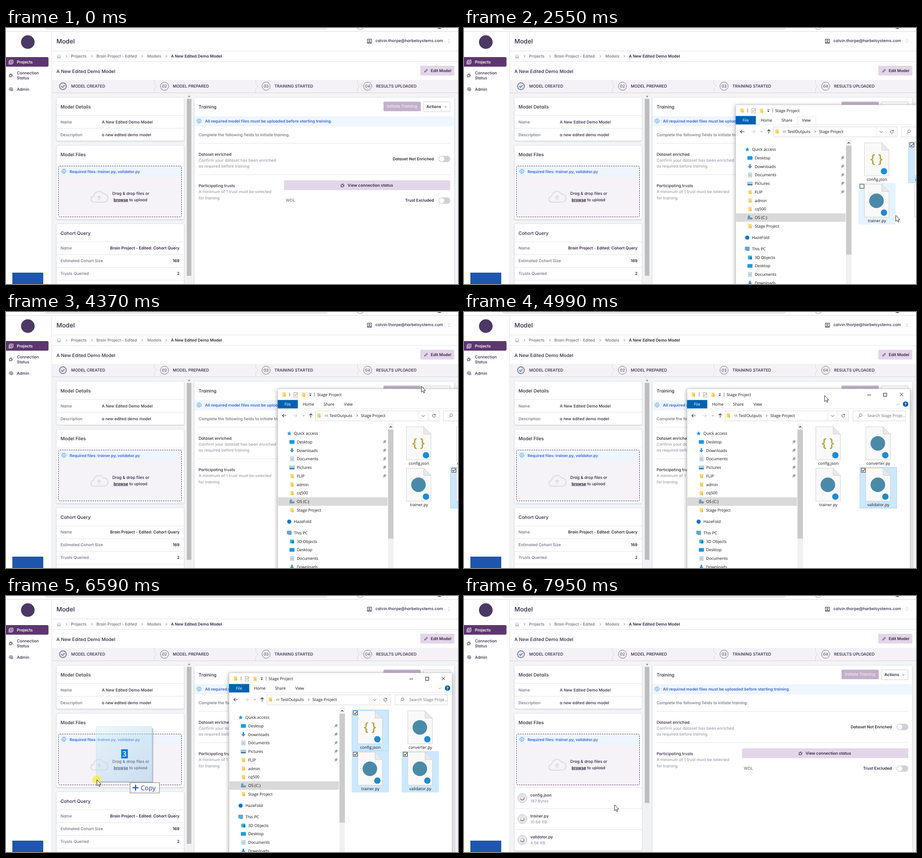
An HTML page that plays this animation: 995 by 563 pixels, repeating every 8000 ms.

```html
<!DOCTYPE html>
<html lang="en">
<head>
<meta charset="utf-8">
<title>Model upload</title>
<style>
html, body { margin: 0; width: 100%; height: 100%; overflow: hidden; background: #fff; }
svg { display: block; width: 995px; height: 563px; }
text { font-family: Inter, sans-serif; font-feature-settings: "cv11"; text-rendering: geometricPrecision; white-space: pre; }
#explorer text, #ghost text { font-family: "Open Sans", "Noto Sans", sans-serif; font-feature-settings: normal; }
#explorer { filter: drop-shadow(0 2px 5px rgba(0, 0, 0, .38)); }
.card { fill: #fff; stroke: #e3e5ea; filter: drop-shadow(0 1px 1px rgba(0, 0, 0, .14)); }
.spin { animation: spin 1s linear infinite; transform-box: fill-box; transform-origin: center; }
@keyframes spin { to { transform: rotate(360deg); } }
</style>
</head>
<body>
<svg id="stage" viewBox="0 0 995 563"></svg>
<script>
const INK = '#2e2640', GREY = '#6d717c', PALE = '#9b9faa', LINE = '#e3e5ea', BLUE = '#3e5fd6', LILAC = '#e4d6e9';

const text = (x, y, str, { size = 8.8, weight = 500, fill = INK, anchor = 'start' } = {}) =>
  `<text x="${x}" y="${y}" font-size="${size}" font-weight="${weight}" fill="${fill}" text-anchor="${anchor}">${str}</text>`;
const rect = (x, y, w, h, fill, extra = '') => `<rect x="${x}" y="${y}" width="${w}" height="${h}" fill="${fill}" ${extra}/>`;
const disc = (x, y, r, fill, extra = '') => `<circle cx="${x}" cy="${y}" r="${r}" fill="${fill}" ${extra}/>`;
const path = (d, stroke = INK, width = 1, fill = 'none', extra = '') =>
  `<path d="${d}" stroke="${stroke}" stroke-width="${width}" fill="${fill}" ${extra}/>`;
const rule = (x1, x2, y, color = LINE) => path(`M${x1} ${y}H${x2}`, color);
const chevron = (x, y, color = GREY, s = 2.5) => path(`M${x - s / 2} ${y - s}l${s} ${s}l${-s} ${s}`, color);
const caret = (x, y, color = GREY, s = 2.5) => path(`M${x - s} ${y - s / 2}l${s} ${s}l${s} ${-s}`, color);
const card = (x, y, w, h) => `<rect class="card" x="${x}" y="${y}" width="${w}" height="${h}" rx="3"/>`;
const info = (x, y) => disc(x, y, 4.5, '#d9eaff', 'stroke="#3f8ae0"') + path(`M${x} ${y - 2.6}v1.2M${x} ${y - .4}v3`, '#3f8ae0', 1.2);
const plug = (x, y) => `<g transform="translate(${x} ${y}) rotate(45)">` +
  path('M-3 -1H3V1.5Q3 3.5 0 3.5Q-3 3.5 -3 1.5ZM-1.5 -1V-4M1.5 -1V-4M0 3.5V6') + '</g>';
const toggle = y => rect(952, y - 7, 26, 14, '#cfd1d6', 'rx="7"') + disc(959.2, y, 5.8, '#fff');

function chrome() {
  const crumbs = [[143, 'Projects'], [199, 'Brain Project - Edited'], [311, 'Models']];
  const steps = ['MODEL CREATED', 'MODEL PREPARED', 'TRAINING STARTED', 'RESULTS UPLOADED'];
  const done = disc(125.3, 128, 7.6, '#dbe3ec', 'stroke="#41506b" stroke-width="1.2"') + path('M121.8 128.2l2.4 2.4l4.6-4.8', '#41506b', 1.1);
  return rect(0, 0, 995, 563, '#fff') + rect(101, 143, 894, 420, '#f3f4f6') +
    rect(83, -12, 627, 16, '#e9ebee', 'rx="8"') + disc(780, -4, 7.5, 'none', 'stroke="#b9bbc0" stroke-width="1.5"') +
    disc(954, -4, 6, '#7c3550') + rule(0, 995, 7.5, '#d9dce1') + path('M100.5 8V563', LINE) +
    disc(48, 31, 15, '#4c3865') +
    rect(-4, 64, 97.6, 21, '#5e366f', 'rx="3"') + text(24, 77.5, 'Projects', { weight: 600, fill: '#fff' }) +
    path('M8.5 70.5h7v7h-7zM6.5 72v7.5h7.5M10 73h4M10 75h4', '#fff') +
    text(24, 102.3, 'Connection') + text(24, 113.3, 'Status') + plug(11, 104) + text(24, 137.5, 'Admin') +
    path('M7 136a4 4 0 0 1 8-2v4M9 138v-3a2 2 0 0 1 4 0v4M11 134.5v4.5', INK, .9) +
    rect(14, 538, 68, 68, '#1f56ad') +
    text(111, 33.5, 'Model', { size: 13.6 }) +
    text(962, 31.3, 'calvin.thorpe@harbelsystems.com', { anchor: 'end', size: 8.9 }) +
    path('M795.5 24.5h9v9h-9zM797.3 33v-1.5h5.4V33', INK) + disc(800, 28, 1.7, 'none', `stroke="${INK}"`) +
    path('M973 27.5l2-2l2 2M973 30l2 2l2-2', PALE, .8) + rule(101, 995, 50.5) +
    path('M112.5 62l4.2-4l4.2 4M113.7 61v5h6v-5M115.5 66v-3h2.4v3', PALE, .9) +
    [133, 189, 300, 353].map(x => chevron(x, 62)).join('') +
    crumbs.map(([x, s]) => text(x, 65.2, s, { fill: GREY })).join('') +
    text(363, 65.2, 'A New Edited Demo Model', { weight: 600 }) + rule(101, 995, 73.5) +
    text(111, 98.5, 'A New Edited Demo Model', { size: 10.2 }) +
    rect(912, 83, 75, 21.5, LILAC, 'rx="2"') + text(980, 97.2, 'Edit Model', { weight: 600, anchor: 'end' }) +
    path('M921.5 97l.5-2l4.5-4.5l1.6 1.6l-4.5 4.5z', INK) +
    rect(101, 114, 894, 28, '#f4f1f7') + rule(101, 995, 142.5, '#d8d3de') + done +
    steps.map((s, i) => {
      const x = 125.3 + 223.6 * i;
      const number = disc(x, 128, 9, 'none', 'stroke="#77717f"') + text(x, 131.2, '0' + (i + 1), { anchor: 'middle', fill: '#5f5967' });
      return (i ? number : '') + text(x + 18.3, 131.2, s, { size: 8.9 }) +
        (i < 3 ? path(`M${x + 201} 114v8l5 6l-5 6v8`, '#dbd6e1') : '');
    }).join('');
}

const row = (y, label, value) => text(120, y, label, { fill: GREY }) + text(382, y, value, { anchor: 'end', weight: 600 });

function fileCard() {
  return rect(116, 303.5, 271, 112, '#f5f2f8') + rect(116, 304, 271, 23, '#edf5ff') +
    rect(115.5, 303.5, 271, 112, 'none', 'rx="3" stroke="#4b2e63" stroke-dasharray="3 2"') +
    text(120, 282, 'Model Files', { size: 10.2 }) + rule(111, 392, 297.5, '#f0f0f3') + info(127.5, 315) +
    text(140, 318.5, 'Required files: trainer.py, validator.py', { size: 8.55, weight: 600, fill: BLUE }) +
    path('M196 383h-2a6.5 6.5 0 0 1-1-13a12 12 0 0 1 22-5a9 9 0 0 1 1 18h-2zM205 379v-9M201 373.5l4-4l4 4', '#dfdde4', 2.6) +
    text(234, 367.3, 'Drag &amp; drop files or') +
    text(237, 380.5, '<tspan font-weight="700" text-decoration="underline">browse</tspan> to upload');
}

function columns() {
  const files = [['config.json', '187 Bytes'], ['trainer.py', '10.68 KB'], ['validator.py', '4.56 KB']];
  const note = { fill: PALE };
  return card(111, 152.5, 281, 95.5) + text(120, 176.5, 'Model Details', { size: 10.2 }) + rule(111, 392, 192.5) +
    text(120, 209.5, 'Name', { fill: GREY }) + text(211, 209.5, 'A New Edited Demo Model') + rule(111, 392, 220.5) +
    text(120, 237.5, 'Description', { fill: GREY }) + text(211, 237.5, 'a new edited demo model') +
    `<g id="empty">${card(111, 258, 281, 163)}${card(111, 430.5, 281, 180)}` +
    text(120, 454.5, 'Cohort Query', { size: 10.2 }) + [470.5, 498.5, 526.5, 554.5].map(y => rule(111, 392, y)).join('') +
    row(487.3, 'Name', 'Brain Project - Edited: Cohort Query') + row(515.3, 'Estimated Cohort Size', '169') +
    row(543.3, 'Trusts Queried', '2') + '</g>' +
    `<g id="filled">${card(111, 258, 281, 302)}` + files.map(([name, size], i) => {
      const y = 444.5 + 46 * i;
      return rule(111, 392, y - 23) + disc(128.3, y, 10, '#ececef', 'stroke="#b9b9bf"') + disc(128.3, y, 7.5, '#f6f6f8', 'stroke="#d2d2d7"') +
        `<g class="spin">${disc(128.3, y, 4, '#fff', 'stroke="#bbbbc2" stroke-width="1.5"')}${path(`M124.3 ${y}a4 4 0 0 0 8 0`, '#4a4a55', 1.5)}</g>` +
        text(146, y - 4, name) + text(146, y + 9, size, note);
    }).join('') + '</g>' + fileCard() +
    rect(397.5, 143, 11.5, 420, '#f1f1f1') + rect(398, 156, 10, 389, '#bdbdbd', 'id="thumb"') +
    path('M400.5 151.5l2.5-3l2.5 3z', 'none', 0, '#777') +
    card(414.5, 152.5, 572.5, 430) + text(424, 177.3, 'Training', { size: 10 }) +
    rect(831, 162, 82, 21, '#c2b1c9', 'rx="2"') + text(872, 175.3, 'Initiate Training', { weight: 600, fill: '#eee7f1', anchor: 'middle' }) +
    rect(918.5, 162.5, 59, 21.5, '#fff', 'rx="2" stroke="#cfcad4"') + text(925.5, 176, 'Actions', { weight: 600 }) + caret(967.5, 173.5, INK, 2) +
    rect(415, 194, 572, 22, '#eef6ff') + info(425, 204.5) +
    text(438, 208, 'All required model files must be uploaded before starting training.', { weight: 600, fill: BLUE }) +
    text(424, 237.5, 'Complete the following fields to initiate training.', { fill: GREY }) + rule(424, 978, 253.5) +
    text(424, 280.5, 'Dataset enriched') + text(424, 293.7, 'Confirm your dataset has been enriched', note) +
    text(424, 307, 'as required before training', note) + text(942, 291.3, 'Dataset Not Enriched', { anchor: 'end', weight: 600 }) +
    toggle(288) + rule(424, 978, 322.5) +
    text(424, 350, 'Participating trusts') + text(424, 363.3, 'A minimum of 1 trust must be selected', note) + text(424, 376.5, 'for training', note) +
    rect(612, 335, 366, 21.5, LILAC, 'rx="2"') + plug(741, 346) + text(752, 348.5, 'View connection status', { weight: 600 }) +
    text(616, 382.3, 'WDL', { fill: GREY }) + text(942, 382.3, 'Trust Excluded', { anchor: 'end', weight: 600 }) + toggle(379.5);
}

const folder = (x, y) => rect(x - 3.5, y - 4.5, 7, 9, '#ffd668') + rect(x + .5, y, 3, 4.5, '#f3b93c');
const icons = {
  star: (x, y) => path(`M${x} ${y - 5}l1.4 3.4l3.6.3l-2.8 2.3l1 3.6l-3.2-2l-3.2 2l1-3.6l-2.8-2.3l3.6-.3z`, 'none', 0, '#2b93dd'),
  screen: (x, y) => rect(x - 5.5, y - 4, 11, 8, '#149be8'),
  down: (x, y) => path(`M${x - 1.7} ${y - 5}h3.4v4.5h3l-4.7 5.2l-4.7-5.2h3z`, 'none', 0, '#3b93d4'),
  doc: (x, y) => rect(x - 3.5, y - 4.5, 7.5, 9, '#e9f3fa', 'stroke="#8fa9ba" stroke-width=".8"') + path(`M${x - 2} ${y - 1}h4.5M${x - 2} ${y + 1.5}h4.5`, '#3d8fc9'),
  photo: (x, y) => rect(x - 5.5, y - 3.5, 11, 7.5, '#a9d8f2', 'stroke="#90a4b2" stroke-width=".7"') + rect(x - 5, y + 1, 10, 2.5, '#3d7195'),
  folder,
  drive: (x, y) => rect(x - 5.5, y - .5, 11, 4.5, '#8b9299') + rect(x - 4.5, y - 4.5, 4.5, 4, '#22a0e8'),
  cloud: (x, y) => disc(x, y, 4.5, '#0f74c7'),
  pc: (x, y) => rect(x - 4.5, y - 4, 9, 6.5, '#4eb1e8', 'stroke="#63798a" stroke-width=".8"') + rect(x - 2, y + 3, 7, 1.5, '#7c8a94'),
  cube: (x, y) => rect(x - 4.5, y - 4, 9, 8.5, '#35b6dd', 'rx="1.5"') + rect(x, y - 1, 4.5, 5.5, '#1479b8')
};

const tiles = [['config.json', 0, 0], ['converter.py', 1, 0], ['trainer.py', 0, 1], ['validator.py', 1, 1]]
  .map(([name, col, line]) => ({ name, x: 270 + 110 * col, y: 81 + 91 * line }));

function tile({ name, x, y }, i) {
  return `<g id="tile${i}" transform="translate(${x} ${y})">` + rect(.5, .5, 81, 90, '#cce8ff', 'class="back"') +
    path('M13.5 2.5h38l16 16v56.5h-54z', '#d2d2d2', 1, '#f9f9f9') + path('M51.5 2.5v16h16z', '#cfcfcf', 1, '#e9e9e9') +
    (i ? disc(40, 39, 16, '#4a8aa9') : text(40, 47, '{ }', { size: 27, weight: 600, fill: '#bfa032', anchor: 'middle' })) +
    disc(56.5, 65, 7, '#1f8ad2') + text(41, 85.8, name, { size: 8.9, weight: 400, fill: '#111', anchor: 'middle' }) +
    `<g class="box">${rect(3.5, 2.5, 9, 9, '#fff', 'stroke="#333"')}${path('M5.3 7l2.2 2.3l4-5', '#222', 1.2, 'none', 'class="tick"')}</g></g>`;
}

function explorer() {
  const label = (x, y, s, fill = '#111') => text(x, y, s, { size: 8.9, weight: 400, fill });
  const quick = [['star', 'Quick access'], ['screen', 'Desktop'], ['down', 'Downloads'], ['doc', 'Documents'], ['photo', 'Pictures'],
    ['folder', 'FLIP'], ['folder', 'admin'], ['folder', 'cq500'], ['drive', 'OS (C:)'], ['folder', 'Stage Project']];
  const pc = [['pc', 'This PC'], ['cube', '3D Objects'], ['screen', 'Desktop'], ['doc', 'Documents'], ['down', 'Downloads']];
  const list = (items, top) => items.map(([icon, name], i) => {
    const y = top + 18.75 * i, dx = i ? 6 : 0;
    return icons[icon](25.5 + dx, y) + label(36 + dx, y + 3.1, name);
  }).join('');
  const pin = y => `<g transform="translate(235 ${y}) rotate(40)">${path('M-1.5 -3.5h3v4h-3zM-3 .5h6M0 .5v4', '#868686', 1, '#b5b5b5')}</g>`;
  return rect(0, 0, 491, 431, '#fff', 'stroke="#b9b9b9" stroke-width=".6"') + folder(14, 12.5) + folder(57, 13) +
    path('M26.5 8v9M81.5 8v9', '#777') + rect(35.5, 8, 8, 10, '#fafafa', 'stroke="#999" stroke-width=".8"') + path('M37 13l2 2l4-5', '#c26c3b') +
    path('M69.5 10.5h5', '#333') + path('M69.5 13h5l-2.5 3z', 'none', 0, '#333') + label(87, 16.2, 'Stage Project') +
    path('M397 13.5h8M432.5 9.5h7v7h-7zM468.5 9l7 7M475.5 9l-7 7', '#111') +
    rect(0, 24.5, 44.5, 18.5, '#0063b1') + label(15, 37.2, 'File', '#fff') +
    rect(136.5, 25.5, 40, 18, '#fdfdfd', 'id="view" stroke="#e6e6e6"') +
    label(55, 37.2, 'Home') + label(101, 37.2, 'Share') + label(146, 37.2, 'View') + rule(1, 490, 43.5, '#ececec') +
    caret(464, 34, '#888', 3) + disc(481, 33.5, 6, '#0b63b0') + text(481, 37, '?', { size: 9, weight: 700, fill: '#fff', anchor: 'middle' }) +
    path('M19.5 59h-9M14 55.5l-3.5 3.5l3.5 3.5M73 63.5v-9M69.5 58l3.5-3.5l3.5 3.5', '#444', 1.2) +
    path('M33.5 59h9M39 55.5l3.5 3.5l-3.5 3.5', '#cfcfcf', 1.2) + caret(57, 59, '#666', 2) +
    rect(83.5, 48.5, 272, 22, '#fff', 'stroke="#d9d9d9"') + path('M309.5 49v21M331.5 49v21', '#e3e3e3') + folder(91, 58.5) +
    path('M107 56.5l-2.5 2.5l2.5 2.5M110.5 56.5l-2.5 2.5l2.5 2.5', '#555') + label(114, 62.1, 'TestOutputs') + chevron(175, 59, '#444') +
    label(183.5, 62.1, 'Stage Project') + caret(320.5, 59.5, '#444', 3.5) +
    path('M346.5 57a3.3 3.3 0 1 0 .8 2.5M347.3 55v2.5h-2.5', '#444') +
    rect(365.5, 48.5, 115, 22, '#fff', 'stroke="#d9d9d9"') + disc(382, 58, 3, 'none', 'stroke="#777"') + path('M380 60.2l-3.5 3.3', '#777') +
    label(397, 62.1, 'Search Stage Proje...', '#6d6d6d') +
    rect(1, 238.5, 241, 18.7, '#d9d9d9') + list(quick, 98) + icons.cloud(25.5, 292) + label(36, 295, 'HazeFold') + list(pc, 316.7) +
    [1, 2, 3, 4, 5].map(i => pin(98 + 18.75 * i)).join('') +
    rect(243, 76, 12, 331, '#f1f1f1') + rect(243, 90, 12, 239.5, '#cbcbcb') + path('M246.5 85l2.5-2.5l2.5 2.5', '#444', 1.3) +
    tiles.map(tile).join('') + rect(1, 408, 489, 22, '#fff') + label(12, 424, '4 items');
}

const ghost = `<defs><linearGradient id="glass" x2="1" y2="1"><stop stop-color="#d3f0f8" stop-opacity=".42"/>` +
  `<stop offset="1" stop-color="#8fc4e6" stop-opacity=".42"/></linearGradient></defs>` +
  path('M4 122H124V4', '#5a6f80', 3, 'none', 'opacity=".4"') + rect(0, 0, 122.5, 120.5, 'url(#glass)', 'stroke="#c4dbe9" stroke-opacity=".6"') +
  rect(55, 50, 14.5, 20, '#0078d7') + text(62.2, 66, '3', { size: 16, weight: 600, fill: '#fff', anchor: 'middle' }) +
  rect(74.5, 123.5, 64.5, 22.5, '#fff', 'stroke="#777"') + path('M80 134.5h13M86.5 128v13', '#1746b5', 2.2) +
  text(98, 140, 'Copy', { size: 14, weight: 400, fill: '#1b3d9e' });

const $ = id => document.getElementById(id);
$('stage').innerHTML = chrome() + columns() + `<g id="explorer">${explorer()}</g><g id="ghost">${ghost}</g>` +
  `<g id="cursor">${disc(0, 0, 9.5, '#f7ef3a', 'id="press" opacity=".75"')}${path('M.5 0V13.4L3.5 10.5L5.7 15L7.7 14.1L5.7 9.8H9.8Z', '#111', .9, '#fff')}</g>`;

const windowTrack = [[2070, 973, 139], [2140, 880, 148], [2210, 740, 163], [2350, 598, 169], [4570, 598, 169], [4900, 491, 169]];
const cursorTrack = [[590, 963, 550], [660, 963, 550], [2210, 896, 176], [2350, 754, 182], [2420, 754, 182], [2480, 757, 203], [2550, 950, 412],
  [2760, 950, 412], [2900, 1000, 395], [3389, 1000, 395], [3390, 949, 392], [3810, 905, 372], [3950, 905, 372], [4100, 908, 330],
  [4370, 914, 163], [4510, 914, 163], [4570, 904, 183], [4900, 797, 183], [4990, 793, 183], [5280, 880, 392], [5500, 812, 392],
  [5640, 812, 392], [5800, 803, 318], [6170, 803, 318], [6380, 600, 350], [6520, 300, 392], [6590, 200.5, 404], [6660, 135, 412],
  [6730, 122, 418], [6990, 132, 420], [7200, 200, 436], [7730, 331, 459]];
const ghostTrack = [[6240, 725, 205], [6380, 560, 235], [6520, 290, 275], [6590, 200, 287], [6660, 112, 293], [6730, 62, 299], [6920, 70, 301]];
const presses = [[2210, 2380], [4510, 4920], [5500, 5570], [5860, 5930], [6100, 6990], [7400, 7470]];
const selectedAt = [[5860, 8000], [0, 3190], [5500, 8000], [3190, 8000]];

function at(track, t) {
  const i = track.findIndex(k => k[0] > t);
  if (i < 0) return track[track.length - 1].slice(1);
  if (!i) return track[0].slice(1);
  const [t0, x0, y0] = track[i - 1], [t1, x1, y1] = track[i], p = (t - t0) / (t1 - t0);
  return [x0 + (x1 - x0) * p, y0 + (y1 - y0) * p];
}
const within = (t, [from, to]) => t >= from && t < to;
const show = (el, on) => el.setAttribute('visibility', on ? 'inherit' : 'hidden');
const move = (el, [x, y]) => el.setAttribute('transform', `translate(${x.toFixed(1)} ${y.toFixed(1)})`);

function draw(t) {
  const win = at(windowTrack, t), cur = at(cursorTrack, t), uploaded = t >= 7060;
  const lastPick = Math.max(...selectedAt.map(([from]) => from).filter(from => from <= t));
  show($('explorer'), within(t, [2070, 7400]));
  move($('explorer'), win);
  show($('view'), within(t, [2480, 2760]));
  show($('cursor'), within(t, [590, 660]) || t >= 2210);
  move($('cursor'), cur);
  show($('press'), presses.some(p => within(t, p)));
  show($('ghost'), within(t, [6240, 6990]));
  move($('ghost'), at(ghostTrack, t));
  show($('empty'), !uploaded);
  show($('filled'), uploaded);
  $('thumb').setAttribute('height', uploaded ? 299 : 389);
  tiles.forEach(({ x, y }, i) => {
    const dx = cur[0] - win[0] - x, dy = cur[1] - win[1] - y, el = $('tile' + i), back = el.querySelector('.back');
    const hover = t >= 2210 && t < 6170 && dx > 0 && dx < 83 && dy > 0 && dy < 91;
    const chosen = within(t, selectedAt[i]), focused = chosen && selectedAt[i][0] === lastPick;
    show(back, hover || chosen);
    back.setAttribute('fill', chosen ? '#cce8ff' : '#e5f3ff');
    back.setAttribute('stroke', focused ? '#a6d6fb' : chosen ? '#cce8ff' : '#e5f3ff');
    show(el.querySelector('.box'), hover || chosen);
    show(el.querySelector('.tick'), chosen);
  });
}

const start = performance.now();
function tick() {
  draw((performance.now() - start) % 8000);
  requestAnimationFrame(tick);
}
tick();
</script>
</body>
</html>
```
